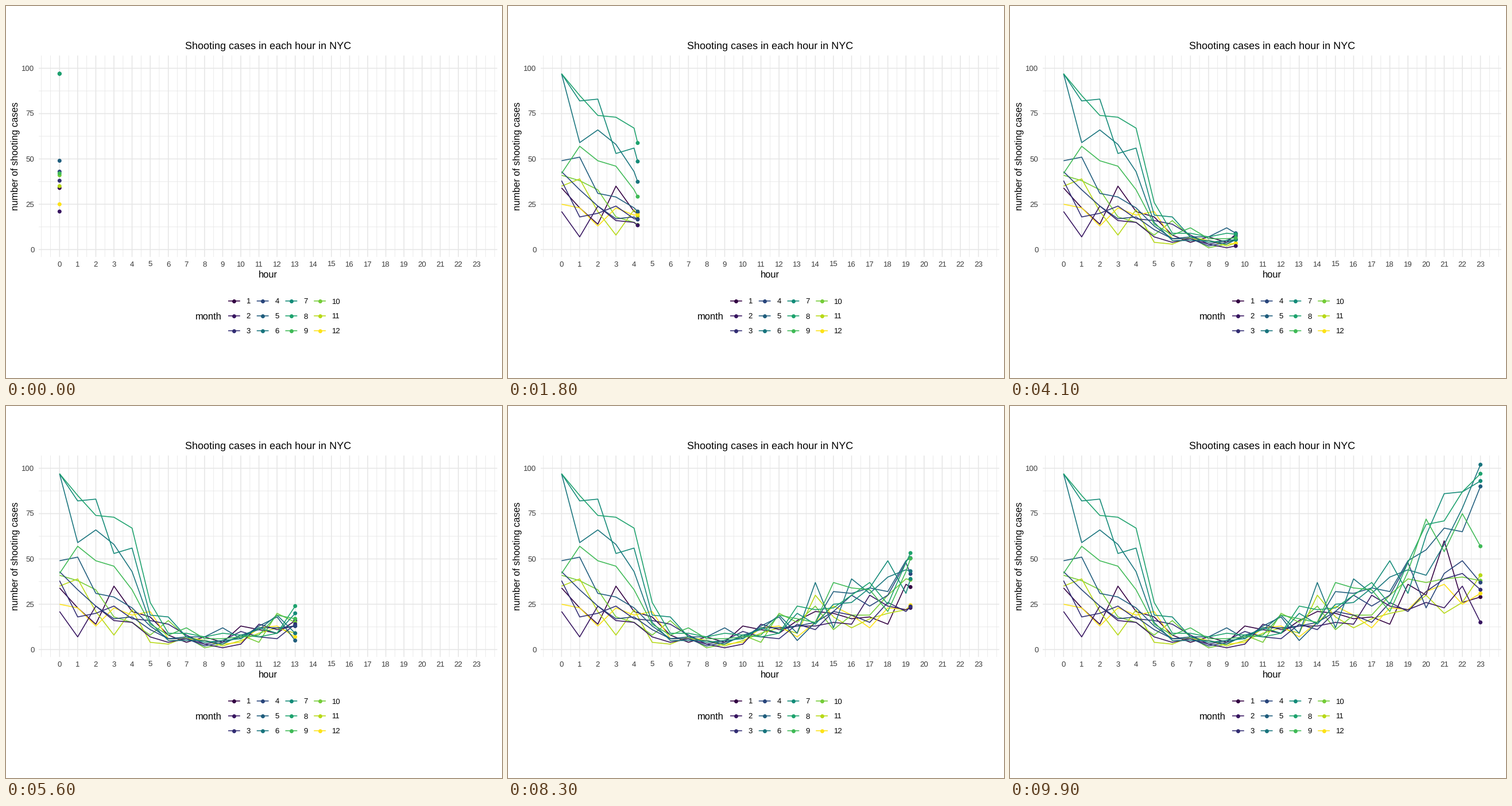
Write a matplotlib script that moves like this. It is 864 by 648 pixels and loops after 10 s.

```python
import matplotlib.pyplot as plt
import numpy as np
from matplotlib.animation import FuncAnimation

W, H, DPI = 864, 648, 72
FRAMES, INTERVAL = 100, 100
HOURS = np.arange(24)
LEFT, RIGHT, TOP, BOTTOM = 57, 855.75, 86.3, 437.1
LINE_W, MINOR_W, DOT = 1.6, 0.8, 6.95

plt.rcParams.update({
    "font.family": "Liberation Sans",
    "text.hinting": "none",
    "lines.solid_capstyle": "butt",
    "lines.solid_joinstyle": "round",
})


def px(hour):
    return 93.3 + 31.574 * np.asarray(hour)


def py(count):
    return 424.3 - 3.158 * np.asarray(count)


def tone(rgb):
    """Darken a colour the way a gamma 1.8 display profile does."""
    return tuple(np.asarray(rgb[:3]) ** 1.22)


viridis = plt.get_cmap("viridis")
COLORS = {m: tone(viridis((m - 1) / 11)) for m in range(1, 13)}
GRID = tone([0.92] * 3)
TICK = tone([0.30] * 3)

cases = {}


def month(number, *counts):
    cases[number] = np.array(counts, float)


month(1, 34, 23, 14, 35, 21, 18, 8, 4, 7, 4, 13, 11,
      9, 16, 21, 20, 17, 18, 14, 36, 30, 60, 26, 29)
month(2, 21, 7, 24, 16, 15, 7, 4, 6, 3, 1, 3, 14,
      11, 13, 13, 15, 14, 30, 24, 22, 26, 23, 35, 15)
month(3, 38, 18, 20, 24, 17, 16, 14, 8, 3, 5, 10, 7,
      6, 14, 11, 21, 19, 15, 26, 21, 32, 39, 42, 33)
month(4, 43, 33, 24, 17, 18, 11, 6, 6, 2, 4, 7, 12,
      12, 13, 15, 21, 30, 24, 30, 48, 23, 42, 49, 37)
month(5, 49, 51, 31, 29, 23, 13, 6, 7, 7, 12, 6, 13,
      18, 5, 15, 32, 31, 34, 32, 49, 55, 67, 65, 90)
month(6, 97, 59, 66, 58, 43, 15, 5, 5, 5, 3, 8, 11,
      19, 9, 37, 12, 39, 31, 40, 44, 41, 58, 78, 102)
month(7, 97, 82, 83, 53, 56, 19, 18, 7, 4, 5, 6, 12,
      9, 20, 14, 25, 26, 34, 49, 31, 63, 86, 87, 93)
month(8, 97, 85, 74, 73, 67, 26, 9, 9, 7, 9, 8, 7,
      9, 24, 22, 23, 30, 37, 25, 48, 69, 71, 87, 97)
month(9, 42, 57, 49, 46, 33, 14, 8, 12, 6, 6, 7, 8,
      19, 17, 15, 37, 34, 33, 21, 43, 72, 54, 75, 57)
month(10, 41, 38, 33, 18, 15, 8, 16, 7, 1, 3, 8, 4,
      20, 15, 24, 11, 19, 19, 30, 39, 37, 39, 40, 38)
month(11, 35, 39, 21, 8, 22, 4, 3, 7, 5, 2, 5, 9,
      12, 9, 30, 18, 12, 17, 20, 22, 30, 20, 26, 41)
month(12, 25, 23, 13, 23, 19, 21, 6, 6, 5, 3, 4, 12,
      13, 7, 15, 24, 19, 12, 23, 22, 32, 36, 25, 31)

ORDER = sorted(cases, key=str)  # months stack in text order: 1, 10, 11, 12, 2, ...
STOPS = np.round(HOURS * (FRAMES - 1) / 23)  # each hour lands on a whole frame

fig = plt.figure(figsize=(W / DPI, H / DPI), dpi=DPI, facecolor="white")
ax = fig.add_axes([0, 0, 1, 1])
ax.set(xlim=(0, W), ylim=(H, 0))
ax.axis("off")


def segment(xs, ys, color, width, z):
    ax.plot(xs, ys, color=color, lw=width, zorder=z, snap=False)


def label(x, y, text, size, color="black", ha="center", **kw):
    ax.text(x, y, text, fontsize=size, color=color, ha=ha, va="baseline", **kw)


def dots(xs, ys, colors, z):
    return ax.scatter(xs, ys, s=DOT ** 2, c=colors, linewidths=0, zorder=z, snap=False)


def vline(hour, width, z):
    segment([px(hour)] * 2, [TOP, BOTTOM], GRID, width, z)


def hline(count, width, z):
    segment([LEFT, RIGHT], [py(count)] * 2, GRID, width, z)


def draw_panel():
    for hour in [-1, *np.arange(-0.5, 24), 24]:
        vline(hour, MINOR_W, 1)
    for count in (12.5, 37.5, 62.5, 87.5):
        hline(count, MINOR_W, 1)
    for hour in HOURS:
        vline(hour, LINE_W, 2)
        label(px(hour), 454.2, str(hour), 13.2, TICK)
    for count in range(0, 101, 25):
        hline(count, LINE_W, 2)
        label(49.4, py(count) + 4.7, str(count), 13.2, TICK, ha="right")
    mid = (LEFT + RIGHT) / 2
    label(mid, 74.4, "Shooting cases in each hour in NYC", 18)
    label(mid, 473, "hour", 16.5)
    label(20.3, (TOP + BOTTOM) / 2, "number of shooting cases", 16.5,
          rotation=90, rotation_mode="anchor")


def draw_legend():
    label(329.6, 545.8, "month", 16.5, ha="left")
    for m, color in COLORS.items():
        col, row = divmod(m - 1, 3)
        x, y = 397.4 + 49.76 * col, 513.8 + 25.92 * row
        segment([x - 10.4, x + 10.4], [y, y], color, LINE_W, 3)
        dots([x], [y], [color], 4)
        label(x + 21.1, y + 4.7, str(m), 13.2, ha="left")


draw_panel()
draw_legend()

lines = [ax.plot([], [], color=COLORS[m], lw=LINE_W, zorder=5 + i / 100, snap=False)[0]
         for i, m in enumerate(ORDER)]
heads = dots(np.zeros(12), np.zeros(12), [COLORS[m] for m in ORDER], 6)


def update(frame):
    now = np.interp(frame, STOPS, HOURS)
    xs = np.append(HOURS[HOURS < now], now)
    tips = []
    for line, m in zip(lines, ORDER):
        ys = np.interp(xs, HOURS, cases[m])
        line.set_data(px(xs), py(ys))
        tips.append((px(now), py(ys[-1])))
    heads.set_offsets(tips)
    return [*lines, heads]


anim = FuncAnimation(fig, update, frames=FRAMES, interval=INTERVAL,
                     repeat=True, repeat_delay=0, blit=False)
plt.show()
```
